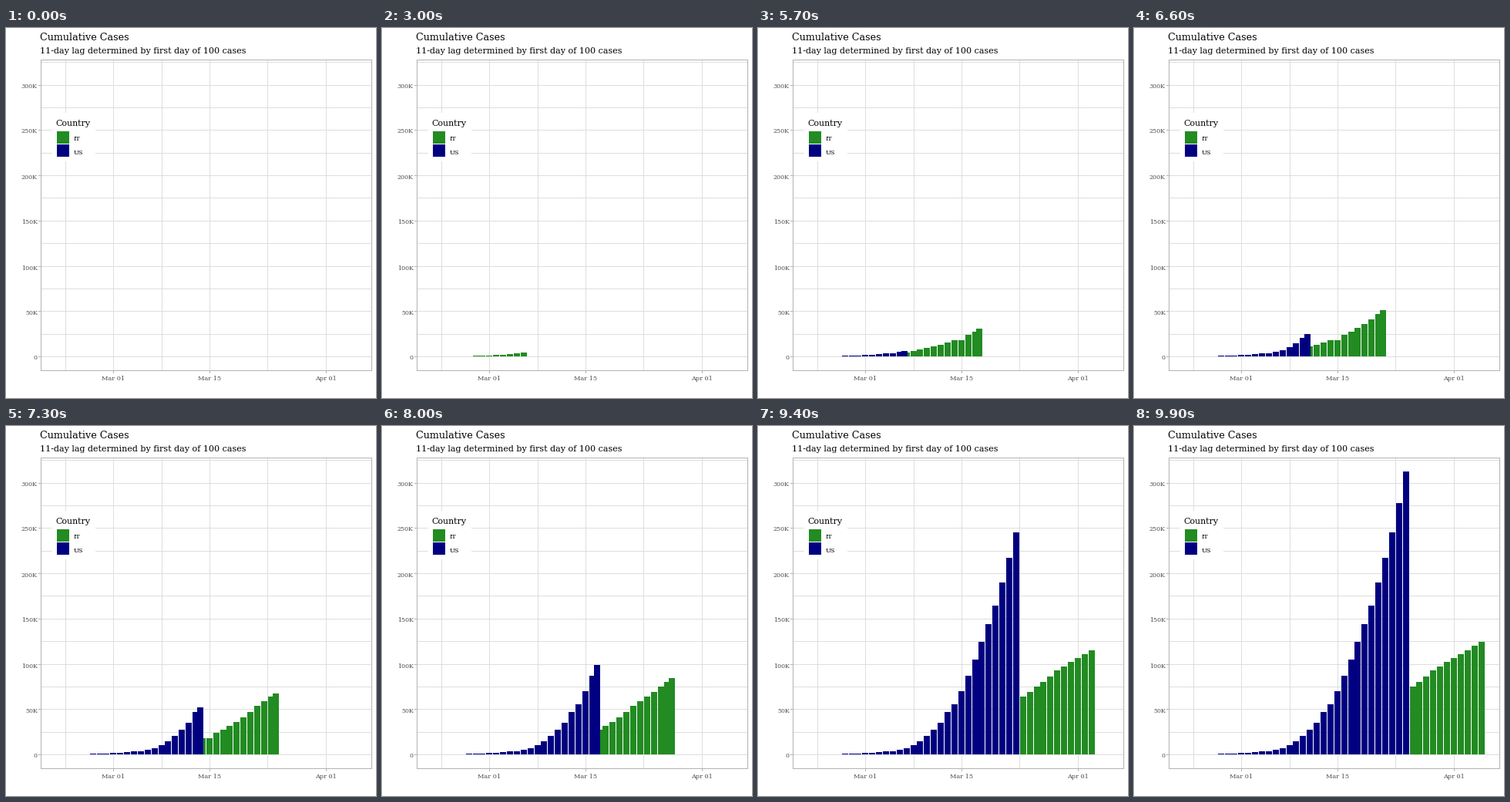
Animation of 480x480 px, one loop 10 s. Source, as a matplotlib script:

```python
import math

import matplotlib.pyplot as plt
import numpy as np
from matplotlib.animation import FuncAnimation
from matplotlib.patches import Rectangle

SIZE, DPI = 480, 96
FRAMES, INTERVAL = 100, 100
LAST = 43                     # days covered, Feb 22 to Apr 5
LAG = 11                      # days the US series is shifted back
START = -8                    # first day (Feb 22), counted from Mar 1

# Pixel geometry of the panel
LEFT, RIGHT, TOP, BOTTOM = 45, 474, 41, 444
MAR1, DAY = 139.29, 8.892     # x of Mar 1, pixels per day
ZERO, PER_K = 425.98, 1.1743  # y of zero, pixels per 1000 cases

GREEN, NAVY = "#228B22", "#000080"
GRID, EDGE, LABEL = "#DEDEDE", "#B3B3B3", "#4D4D4D"

# The square root of the case count grows in nearly straight stretches;
# these are the bends as (day, root).
IT_BENDS = [(0, 4), (5, 20), (10, 45.1), (14, 68.1), (21, 132.9),
            (22, 133.2), (23, 154.9), (26, 189), (29, 231.5), (36, 304.1),
            (38, 319), (43, 353)]
US_BENDS = [(0, 6.5), (5, 23.5), (8, 36.2), (12, 61.4), (14, 80.2),
            (16, 119.4), (19, 187.6), (20, 215.5), (21, 235), (25, 353.1),
            (27, 405.7), (30, 495.5), (32, 558.8)]


def px(v):
    return math.floor(v + 0.5)


def day_x(day):
    return MAR1 + day * DAY


def cases_y(n):
    return ZERO - n / 1000 * PER_K


def daily_counts(bends):
    days, roots = zip(*bends)
    return np.interp(np.arange(days[-1] + 1), days, roots) ** 2


fig = plt.figure(figsize=(SIZE / DPI, SIZE / DPI), dpi=DPI, facecolor="white")
ax = fig.add_axes([0, 0, 1, 1])
ax.set_xlim(0, SIZE)
ax.set_ylim(SIZE, 0)
ax.axis("off")


def box(x0, y0, x1, y1, color, z):
    return ax.add_patch(Rectangle((x0, y0), x1 - x0, y1 - y0, facecolor=color,
                                  linewidth=0, antialiased=False, zorder=z))


def hline(x0, x1, y, color, z):
    box(x0, y, x1, y + 1, color, z)


def vline(x, y0, y1, color, z):
    box(x, y0, x + 1, y1, color, z)


def text(x, y, s, size, color="black", ha="left"):
    ax.text(x, y, s, fontsize=size * 72 / DPI, family="DejaVu Serif",
            color=color, ha=ha, va="baseline", zorder=8)


def draw_panel():
    for k in range(0, 326, 25):
        y = px(cases_y(k * 1000))
        hline(LEFT, RIGHT, y, GRID, 1)
        if k % 50 == 0:
            hline(LEFT - 3, LEFT, y, EDGE, 1)
            text(41, y + 4.5, f"{k}K" if k else "0", 8, LABEL, "right")

    for day in (-7, 0, 7, 14, 22.5, 31):
        vline(px(day_x(day)), TOP, BOTTOM, GRID, 1)
    for day, name in ((0, "Mar 01"), (14, "Mar 15"), (31, "Apr 01")):
        x = px(day_x(day))
        vline(x, BOTTOM + 1, BOTTOM + 4, EDGE, 1)
        text(x, 457, name, 8.1, LABEL, "center")

    for y in (TOP, BOTTOM):
        hline(LEFT, RIGHT + 1, y, EDGE, 6)
    for x in (LEFT, RIGHT):
        vline(x, TOP, BOTTOM + 1, EDGE, 6)

    text(44.5, 16, "Cumulative Cases", 12.75)
    text(44.5, 33, "11-day lag determined by first day of 100 cases", 11.1)


def draw_legend():
    box(60, 110, 116, 173, "white", 2)
    text(64.5, 127, "Country", 11)
    for y, color, name in ((134, GREEN, "IT"), (151, NAVY, "US")):
        box(66, y, 82, y + 16, color, 3)
        text(88, y + 12.5, name, 8.1)


class Series:
    """Bars revealed day by day, with a moving bar at the leading edge."""

    def __init__(self, bends, color, delay, z):
        self.counts, self.delay = daily_counts(bends), delay
        self.bars = [box(0, 0, 0, 0, color, z) for _ in self.counts]
        self.tip = box(0, 0, 0, 0, color, z)
        for i, bar in enumerate(self.bars):
            self.place(bar, i)

    def place(self, bar, pos):
        count = np.interp(pos, np.arange(len(self.counts)), self.counts)
        mid, half = day_x(START + pos), 0.45 * DAY
        x0, x1 = px(mid - half), px(mid + half)
        y0, y1 = px(cases_y(count)), px(ZERO)
        bar.set_bounds(x0, y0, x1 - x0, y1 - y0)

    def show(self, day):
        pos = day - self.delay
        for i, bar in enumerate(self.bars):
            bar.set_visible(i <= pos and bar.get_height() > 0)
        self.place(self.tip, max(pos, 0))
        self.tip.set_visible(pos >= 0 and self.tip.get_height() > 0)


draw_panel()
draw_legend()
series = [Series(IT_BENDS, GREEN, 0, 4), Series(US_BENDS, NAVY, LAG, 5)]

# Each day lands on a whole frame; motion between days is linear
DAYS = np.arange(LAST + 1)
KEYS = np.round(DAYS * (FRAMES - 1) / LAST)


def update(frame):
    day = np.interp(frame, KEYS, DAYS)
    for s in series:
        s.show(day)
    return []


anim = FuncAnimation(fig, update, frames=FRAMES, interval=INTERVAL,
                     init_func=lambda: update(0), repeat=True, repeat_delay=0)
plt.show()
```
